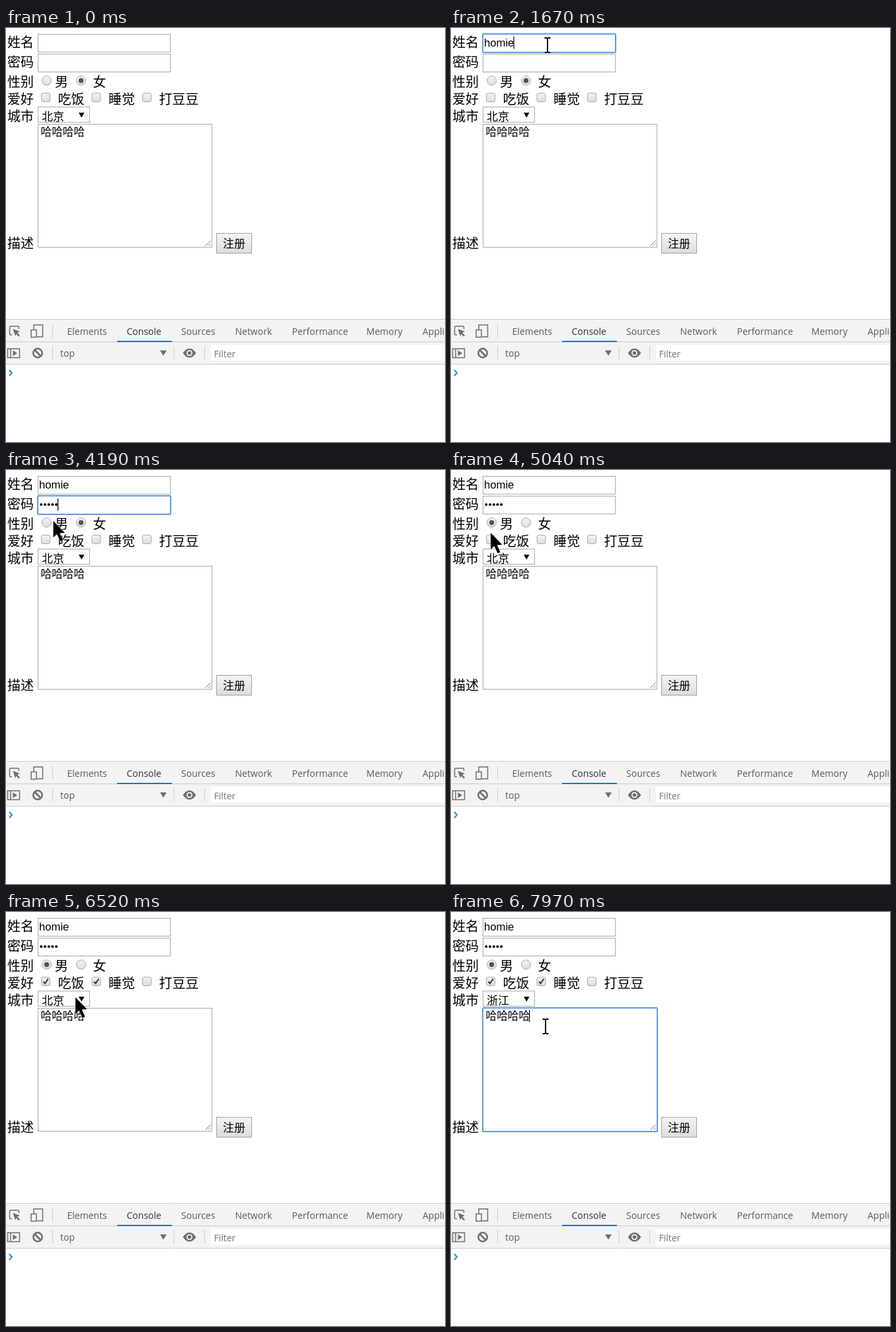
Write an HTML page that moves like this. It is 664x626 px and loops after 8 s.

```html
<!DOCTYPE html>
<html lang="zh-CN">
<head>
<meta charset="utf-8">
<title>Form</title>
<style>
html, body { margin: 0; width: 100%; height: 100%; overflow: hidden; background: #fff; }
svg { display: block; }
.label { font: 20px "Noto Sans CJK SC", "Noto Sans CJK", sans-serif; }
.field { font: 17px "Noto Sans CJK SC", "Noto Sans CJK", sans-serif; }
.latin { font: 16.67px "Liberation Sans", Arial, sans-serif; }
.tools { font: 14px "Open Sans", "Noto Sans", sans-serif; fill: #5a5a5a; }
.box { fill: #fff; stroke: #a9a9a9; }
.ring { fill: none; stroke: #5e9ae6; stroke-width: 2; }
.line { fill: none; stroke: #6e6e6e; stroke-width: 1.5; }
.rule { stroke: #ccc; }

/* Everything shares one 8 s clock; percentages are ms / 80. */
.t { opacity: 0; animation: 8s step-end -10ms infinite; }
.move { opacity: 1; }
@keyframes nameFocus { 8.38% { opacity: 1 } 36.63% { opacity: 0 } }
@keyframes passFocus { 36.63% { opacity: 1 } 56.25% { opacity: 0 } }
@keyframes cityFocus { 82.25% { opacity: 1 } 95.75% { opacity: 0 } }
@keyframes noteFocus { 99.38% { opacity: 1 } }
@keyframes male { 57.25% { opacity: 1 } }
@keyframes female { 0% { opacity: 1 } 57.25% { opacity: 0 } }
@keyframes eat { 64.88% { opacity: 1 } }
@keyframes sleep { 74.38% { opacity: 1 } }
@keyframes oldCity { 0% { opacity: 1 } 91.88% { opacity: 0 } }
@keyframes newCity { 91.88% { opacity: 1 } }
@keyframes list { 83.25% { opacity: 1 } 91.88% { opacity: 0 } }
@keyframes hot1 { 85.13% { opacity: 1 } 86.13% { opacity: 0 } }
@keyframes hot2 { 0% { opacity: 1 } 85.13% { opacity: 0 } 86.13% { opacity: 1 } 88% { opacity: 0 } }
@keyframes hot3 { 88% { opacity: 1 } }
@keyframes typeName {
  16.25% { transform: translate(9px) } 18.13% { transform: translate(18.3px) }
  19% { transform: translate(32.2px) } 20% { transform: translate(35.9px) }
  20.88% { transform: translate(46px) }
}
@keyframes typePass {
  39.5% { transform: translate(5.7px) } 41.63% { transform: translate(11.4px) }
  44.63% { transform: translate(17.1px) } 46.5% { transform: translate(22.8px) }
  47.5% { transform: translate(30px) }
}
@keyframes caret {
  0% { transform: translate(50px, 13px) }
  8.38% { opacity: 1 } 14.13% { opacity: 0 }
  16.25% { opacity: 1; transform: translate(58.7px, 13px) }
  18.13% { transform: translate(68px, 13px) }
  19% { transform: translate(82px, 13px) }
  20% { transform: translate(85.6px, 13px) }
  20.88% { transform: translate(94.4px, 13px) }
  27.75% { opacity: 0 } 33.75% { opacity: 1 }
  36.63% { transform: translate(50px, 43px) }
  39.5% { transform: translate(56px, 43px) }
  41.63% { transform: translate(61px, 43px) }
  44.63% { transform: translate(67px, 43px) }
  46.5% { transform: translate(72px, 43px) }
  47.5% { transform: translate(78px, 43px) }
  54.38% { opacity: 0 }
  99.38% { opacity: 1; transform: translate(118px, 148px) }
}
@keyframes pointer {
  0% { transform: translate(492px, 456px) }
  1.88% { transform: translate(468px, 424px) }
  2.75% { transform: translate(424px, 364px) }
  3.75% { transform: translate(366px, 290px) }
  4.63% { transform: translate(304px, 210px) }
  5.63% { transform: translate(244px, 132px) }
  6.5% { transform: translate(196px, 76px) }
  7.5% { transform: translate(162px, 44px) }
  8.38% { transform: translate(148px, 28px) }
  9.38% { transform: translate(146px, 26px) }
  31.75% { transform: translate(146px, 29px) }
  32.75% { transform: translate(144px, 36px) }
  33.75% { transform: translate(145px, 44px) }
  34.75% { transform: translate(145px, 46px) }
  38.5% { transform: translate(155px, 42px) }
  39.5% { transform: translate(144px, 46px) }
  47.5% { transform: translate(138px, 48px) }
  48.5% { transform: translate(124px, 54px) }
  49.38% { transform: translate(108px, 62px) }
  50.38% { transform: translate(92px, 69px) }
  51.38% { transform: translate(79px, 75px) }
  52.38% { transform: translate(71.5px, 77px) }
  53.38% { transform: translate(69px, 77px) }
  54.38% { transform: translate(67px, 77px) }
  58.25% { transform: translate(66px, 82px) }
  59.13% { transform: translate(62px, 89px) }
  60.13% { transform: translate(60px, 94px) }
  63% { transform: translate(60px, 95px) }
  65.88% { transform: translate(54px, 98px) }
  66.75% { transform: translate(49px, 100px) }
  67.75% { transform: translate(62px, 100px) }
  68.75% { transform: translate(88px, 97px) }
  69.63% { transform: translate(114px, 99px) }
  70.63% { transform: translate(134px, 101px) }
  71.63% { transform: translate(141px, 102px) }
  73.5% { transform: translate(140.5px, 101px) }
  75.38% { transform: translate(138px, 102px) }
  76.38% { transform: translate(126px, 104px) }
  77.38% { transform: translate(117px, 108px) }
  78.38% { transform: translate(112px, 112px) }
  79.38% { transform: translate(108px, 118px) }
  80.38% { transform: translate(106px, 125px) }
  81.25% { transform: translate(105px, 129px) }
  82.25% { transform: translate(104px, 130px) }
  84.25% { transform: translate(103px, 134px) }
  85.13% { transform: translate(99px, 154px) }
  86.13% { transform: translate(96.5px, 172px) }
  87.13% { transform: translate(94px, 182px) }
  88% { transform: translate(92px, 192px) }
  89% { transform: translate(91px, 198px) }
  90% { transform: translate(90px, 201px) }
  92.88% { transform: translate(91px, 200px) }
  93.88% { transform: translate(92px, 199px) }
  95.75% { transform: translate(100px, 194px) }
  96.75% { transform: translate(120px, 184px) }
  97.75% { transform: translate(137px, 176px) }
  98.63% { transform: translate(143px, 173px) }
}
@keyframes arrow {
  .88% { opacity: 1 } 4.63% { opacity: 0 } 5.63% { opacity: 1 } 7.5% { opacity: 0 }
  32.75% { opacity: 1 } 33.75% { opacity: 0 } 50.38% { opacity: 1 } 51.38% { opacity: 0 }
  52.38% { opacity: 1 } 66.75% { opacity: 0 } 67.75% { opacity: 1 } 68.75% { opacity: 0 }
  70.63% { opacity: 1 } 77.38% { opacity: 0 } 79.38% { opacity: 1 } 91.88% { opacity: 0 }
}
@keyframes beam {
  4.63% { opacity: 1 } 5.63% { opacity: 0 } 7.5% { opacity: 1 }
  32.75% { opacity: 0 } 33.75% { opacity: 1 } 50.38% { opacity: 0 } 51.38% { opacity: 1 }
  52.38% { opacity: 0 } 66.75% { opacity: 1 } 67.75% { opacity: 0 } 68.75% { opacity: 1 }
  70.63% { opacity: 0 } 77.38% { opacity: 1 } 79.38% { opacity: 0 } 91.88% { opacity: 1 }
}
</style>
</head>
<body>
<svg width="664" height="626" viewBox="0 0 664 626">
  <defs>
    <linearGradient id="face" x2="0" y2="1">
      <stop stop-color="#f4f4f4"/><stop offset="1" stop-color="#dcdcdc"/>
    </linearGradient>
    <clipPath id="cityClip"><path d="M49 120H126V142H49z"/></clipPath>
    <g id="radio"><circle r="7" fill="url(#face)" stroke="#a6a6a6"/></g>
    <rect id="check" x="-6.5" y="-6.5" width="13" height="13" rx="2.5" fill="url(#face)" stroke="#a9a9a9"/>
    <path id="tick" d="M-3.5 .2L-1 3L3.8-4" fill="none" stroke="#3c3c3c" stroke-width="2.2"/>
    <path id="bar" d="M-4.5-11H-1.5L0-10L1.5-11H4.5M0-10V10M-4.5 11H-1.5L0 10L1.5 11H4.5"/>
  </defs>

  <g class="label">
    <text x="2" y="28.5">姓名</text>
    <text x="2" y="58.5">密码</text>
    <text x="2" y="88.5">性别</text>
    <text x="74" y="88.5">男</text>
    <text x="131.5" y="88.5">女</text>
    <text x="2" y="114.5">爱好</text>
    <text x="78.5" y="114.5">吃饭</text>
    <text x="155" y="114.5">睡觉</text>
    <text x="231.5" y="114.5">打豆豆</text>
    <text x="2" y="140.5">城市</text>
    <text x="2" y="332.5">描述</text>
  </g>

  <rect class="box" x="48.5" y="9.5" width="200" height="27"/>
  <text class="latin" x="50" y="28">homie</text>
  <rect class="t move" style="animation-name:typeName" x="50" y="12" width="47" height="22" fill="#fff"/>
  <rect class="ring t" style="animation-name:nameFocus" x="48" y="9" width="201" height="28" rx="1"/>

  <rect class="box" x="48.5" y="39.5" width="200" height="27"/>
  <g>
    <circle cx="53.3" cy="52.3" r="2"/><circle cx="59" cy="52.3" r="2"/><circle cx="64.7" cy="52.3" r="2"/>
    <circle cx="70.4" cy="52.3" r="2"/><circle cx="76.1" cy="52.3" r="2"/>
  </g>
  <rect class="t move" style="animation-name:typePass" x="50.3" y="42" width="30" height="22" fill="#fff"/>
  <rect class="ring t" style="animation-name:passFocus" x="48" y="39" width="201" height="28" rx="1"/>

  <use href="#radio" x="61.5" y="79.5"/>
  <use href="#radio" x="113.5" y="79.5"/>
  <circle class="t" style="animation-name:male" cx="61.5" cy="79.5" r="3.7" fill="#555"/>
  <circle class="t" style="animation-name:female" cx="113.5" cy="79.5" r="3.7" fill="#555"/>

  <use href="#check" x="60" y="105"/>
  <use href="#check" x="136.5" y="105"/>
  <use href="#check" x="213" y="105"/>
  <g class="t" style="animation-name:eat"><use href="#tick" x="60" y="105"/></g>
  <g class="t" style="animation-name:sleep"><use href="#tick" x="136.5" y="105"/></g>

  <rect class="box" x="48.5" y="119.5" width="78" height="23"/>
  <g class="field" clip-path="url(#cityClip)">
    <text class="t" style="animation-name:oldCity" x="54" y="140">北京</text>
    <text class="t" style="animation-name:newCity" x="54" y="140">浙江</text>
  </g>
  <path d="M110 128H118.5L114.2 135.5z"/>

  <rect class="box" x="48.5" y="145.5" width="263" height="186"/>
  <text class="field" style="font-size:16.67px;font-weight:300" x="52.5" y="162.5">哈哈哈哈</text>
  <path d="M301.5 329.5L309.5 321.5M306 329.5L309.5 326" stroke="#777"/>
  <rect class="ring t" style="animation-name:noteFocus" x="48" y="145" width="264" height="187" rx="1"/>
  <rect class="ring t" style="animation-name:cityFocus" x="48" y="119" width="79" height="24" rx="1"/>

  <g class="field t" style="animation-name:list">
    <path d="M49 142H127V240H49z" fill="#fff"/>
    <path d="M49.5 142V239.5H127" fill="none" stroke="#777"/>
    <text x="55" y="160">请选择</text>
    <text x="55" y="184">北京</text>
    <text x="55" y="208">浙江</text>
    <text x="55" y="232">江苏</text>
    <g fill="#fff">
      <g class="t" style="animation-name:hot1"><path d="M50 142H127V166H50z" fill="#1e90ff"/><text x="55" y="160">请选择</text></g>
      <g class="t" style="animation-name:hot2"><path d="M50 166H127V190H50z" fill="#1e90ff"/><text x="55" y="184">北京</text></g>
      <g class="t" style="animation-name:hot3"><path d="M50 190H127V214H50z" fill="#1e90ff"/><text x="55" y="208">浙江</text></g>
    </g>
  </g>

  <rect x="318.5" y="310.5" width="53" height="30" fill="url(#face)" stroke="#a0a0a0"/>
  <text class="field" x="328" y="332">注册</text>

  <!-- developer tools -->
  <path d="M0 440H664V509H0z" fill="#f3f3f3"/>
  <path class="rule" d="M0 440.5H664M0 474.5H664M0 508.5H664M70.5 448V468M70.5 481V501M254 481V501M300.5 481V501"/>
  <path d="M168 473H251V475H168z" fill="#1a73d0"/>
  <path d="M310 479H664V503H310z" fill="#fff"/>
  <g class="tools">
    <text x="92.5" y="464">Elements</text>
    <text x="182.5" y="464" fill="#333">Console</text>
    <text x="265" y="464">Sources</text>
    <text x="346.5" y="464">Network</text>
    <text x="432.5" y="464">Performance</text>
    <text x="545" y="464">Memory</text>
    <text x="630" y="464">Application</text>
    <text x="82" y="497">top</text>
    <text x="314.5" y="498" fill="#757575">Filter</text>
  </g>
  <g class="line">
    <path d="M9 464H7Q5.500 464 5.500 462.500V452.500Q5.500 451 7 451H18Q19.500 451 19.500 452.500V455"/>
    <path d="M42 456V449H55.500V467H47"/>
    <path d="M38 456.500H46V467.500H38z"/>
    <path d="M2.500 485H20.500V498.500H2.500zM7 485V498.500"/>
    <circle cx="48" cy="491.500" r="6.700" stroke-width="2.500"/>
    <path d="M43.500 487L52.500 496" stroke-width="2.500"/>
  </g>
  <g fill="#6e6e6e">
    <path d="M10.500 455L21 459L17.200 460.800L21 465L19.300 466.700L15.500 462.500L14 466z"/>
    <path d="M10.500 487.500L17 491.700L10.500 496z"/>
    <path d="M233 487.500H243L238 495.500z"/>
    <path d="M267.500 491.500Q277.500 477.500 287.500 491.500Q277.500 505.500 267.500 491.500z"/>
  </g>
  <circle cx="277.500" cy="491.500" r="3.600" fill="#6e6e6e" stroke="#f3f3f3" stroke-width="1.800"/>
  <path d="M5 517L9 521.500L5 526" fill="none" stroke="#2e8bf0" stroke-width="2"/>

  <rect class="t" style="animation-name:caret" width="1.200" height="18.500"/>
  <g class="t move" style="animation-name:pointer">
    <path class="t" style="animation-name:arrow" d="M0 0V25L5.500 20L10.500 31L14.500 29.300L9.700 18.500L17.500 18z" stroke="#fff" paint-order="stroke"/>
    <g class="t" style="animation-name:beam" fill="none">
      <use href="#bar" stroke="#fff" stroke-width="4"/>
      <use href="#bar" stroke="#000" stroke-width="2"/>
    </g>
  </g>
</svg>
</body>
</html>
```
